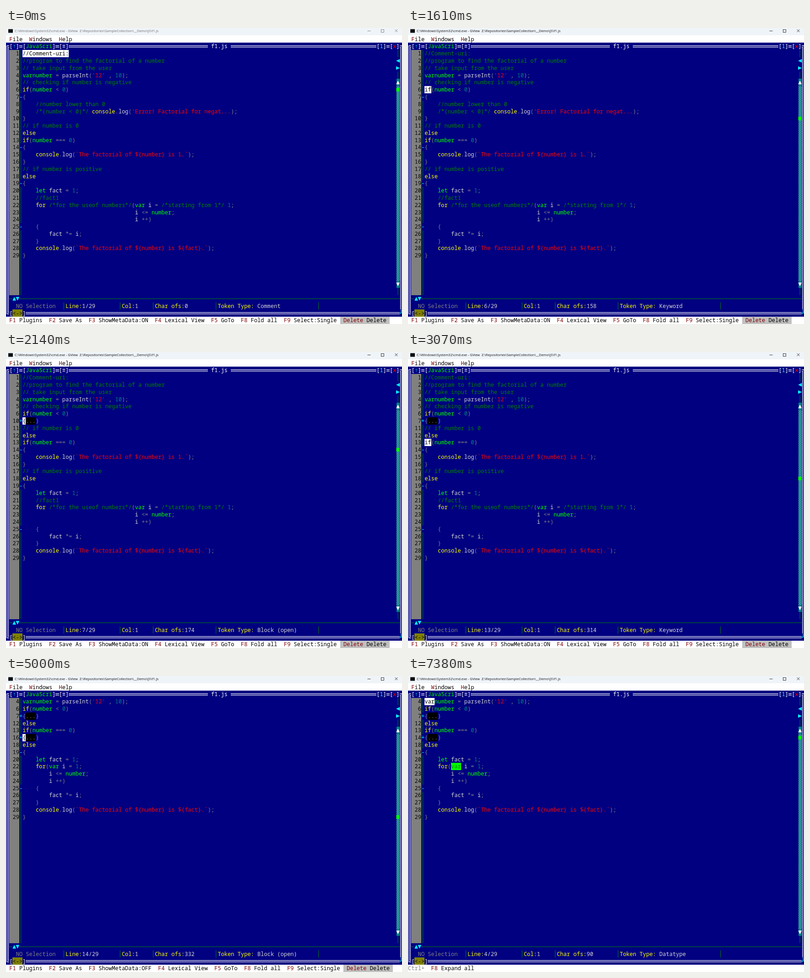
These frames come from a looping animation (865 by 648 pixels, 8320 ms). An HTML page with a canvas:

```html
<!DOCTYPE html>
<html lang="en">
<head>
<meta charset="utf-8">
<title>Code folding</title>
<style>
html, body { margin: 0; width: 100%; height: 100%; overflow: hidden; background: #000080; }
canvas { display: block; }
</style>
</head>
<body>
<canvas id="stage" width="865" height="648"></canvas>
<script>
const g = document.getElementById('stage').getContext('2d');
const LOOP = 8320, CW = 7.225, RH = 15.785, TOP = 16.6;
const NAVY = '#000080', GREEN = '#008000', LIME = '#00ff00', AQUA = '#00ffff', TEAL = '#008080',
  GRAY = '#808080', SILVER = '#d4d4d4', YELLOW = '#ffff00', MAROON = '#800000', WHITE = '#ffffff', BLACK = '#000000';

const SOURCE = `//Comment-uri:
//program to find the factorial of a number
// take input from the user
varnumber = parseInt('12' , 10);
// checking if number is negative
if(number < 0)
{
    //number lower than 0
    /*(number < 0)*/ console.log('Error! Factorial for negat...);
}
// if number is 0
else
if(number === 0)
{
    console.log(\`The factorial of \${number} is 1.\`);
}
// if number is positive
else
{
    let fact = 1;
    //fact1
    for /*for the useof numbers*/(var i = /*starting from 1*/ 1;
                                  i <= number;
                                  i ++)
    {
        fact *= i;
    }
    console.log(\`The factorial of \${number} is \${fact}.\`);
}`.split('\n');

const TOKEN = /\/\/.*|\/\*.*?\*\/|'[^')]*'?|`[^`]*`|var|let|number|[a-z]\w*|\d+|\S/gi;

// start time, line under the cursor
const STEPS = [[0, 1], [540, 2], [930, 3], [1130, 4], [1330, 5], [1610, 6], [1940, 7], [2670, 11],
  [2870, 12], [3070, 13], [3200, 14], [6260, 13], [6460, 12], [6590, 7], [6720, 6], [6920, 4]];
// line: character offset, token index
const PLACE = { 1: [0, 0], 2: [16, 1], 3: [61, 2], 4: [90, 3], 5: [123, 13], 6: [158, 14], 7: [174, 20],
  11: [289, 31], 12: [308, 32], 13: [314, 33], 14: [332, 39] };
// first line of a block: last line, time it folds
const FOLDS = { 7: [10, 2140], 14: [16, 3730] };

const colX = col => col * CW;
const rowY = row => TOP + row * RH;
const midX = col => colX(col + 0.5);
const midY = row => rowY(row + 0.5);

function rect(x, y, w, h, color) {
  g.fillStyle = color;
  g.fillRect(x, y, w, h);
}

// Fills whole character cells, with edges on whole pixels.
function cells(col, row, n, color, rows = 1) {
  const x = Math.round(colX(col)), y = Math.round(rowY(row));
  rect(x, y, Math.round(colX(col + n)) - x, Math.round(rowY(row + rows)) - y, color);
}

function text(str, col, row, color, back) {
  if (back) cells(col, row, str.length, back);
  g.fillStyle = color;
  [...str].forEach((ch, i) => {
    if (ch !== ' ') g.fillText(ch, midX(col + i), midY(row) + 4.2);
  });
  return col + str.length;
}

function line(x1, y1, x2, y2, color, width = 1) {
  g.strokeStyle = color;
  g.lineWidth = width;
  g.beginPath();
  g.moveTo(x1, y1);
  g.lineTo(x2, y2);
  g.stroke();
}

function vline(col, row, rows = 1) {
  line(midX(col), rowY(row), midX(col), rowY(row + rows), GREEN);
}

function triangle(col, row, turn, color) {
  g.save();
  g.translate(midX(col), midY(row));
  g.rotate(turn * Math.PI / 2);
  g.fillStyle = color;
  g.beginPath();
  g.moveTo(0, -4);
  g.lineTo(3.8, 4);
  g.lineTo(-3.8, 4);
  g.fill();
  g.restore();
}

function tokenColor(s) {
  if (/^\/[/*]/.test(s)) return GREEN;
  if (/^['`]/.test(s)) return '#ff0000';
  if (/^(if|else|for|console)$/.test(s)) return YELLOW;
  if (/^(var|let|number)$/.test(s)) return LIME;
  if (/^\d/.test(s)) return TEAL;
  return /^\w/.test(s) ? SILVER : GRAY;
}

function tokenType(s) {
  if (s.startsWith('//')) return 'Comment';
  if (s.startsWith('var')) return 'Datatype';
  return s === '{' ? 'Block (open)' : 'Keyword';
}

function drawTitle(t) {
  rect(0, 0, 865, 16, '#eff4f9');
  rect(0, 16, 865, 17, WHITE);
  rect(5, 2.5, 10, 8, '#0c0c0c');
  const level = t < 260 ? 110 : t < 400 ? 70 : t < 540 ? 35 : 15;
  const ink = `rgb(${level},${level},${level})`;
  g.font = '7.5px "Open Sans", "Noto Sans", sans-serif';
  g.textAlign = 'left';
  g.fillStyle = ink;
  g.fillText('C:\\Windows\\System32\\cmd.exe - GView  Z:\\Repositories\\SampleCollection\\__Demo\\JS\\f1.js', 19, 9);
  line(789.5, 6.5, 796.5, 6.5, ink, 0.8);
  g.strokeRect(819.5, 3.5, 6, 6);
  line(849.5, 3, 855.5, 9, ink, 0.8);
  line(855.5, 3, 849.5, 9, ink, 0.8);
}

function drawFrame() {
  cells(0, 1, 120, NAVY, 38);
  g.strokeStyle = WHITE;
  g.lineWidth = 1.2;
  for (const d of [-1.6, 1.6]) {
    const x = midX(0) + d, y = midY(1) + d;
    g.strokeRect(x, y, midX(119) - d - x, midY(38) - d - y);
  }
  const label = (parts, col, row) => {
    for (const [s, color, back = NAVY] of parts) col = text(s, col, row, color, back);
  };
  const boxed = (s, color, back) => [['[', WHITE], [s, color, back], [']', WHITE]];
  label(boxed('↑', AQUA), 1, 1);
  label(boxed('JavaScri', LIME), 5, 1);
  label(boxed('≡', WHITE), 16, 1);
  label([[' f1.js ', WHITE]], 61, 1);
  label(boxed('1', AQUA), 112, 1);
  label(boxed('x', '#ff0000'), 116, 1);
  label(boxed('<->', BLACK, '#808000'), 1, 38);
  cells(119, 38, 1, NAVY);
  line(midX(119), rowY(38), midX(119), midY(38) + 0.5, AQUA, 1.4);
  line(colX(119), midY(38), midX(119), midY(38), AQUA, 1.4);
}

function drawScroll(token) {
  vline(118, 2);
  triangle(118, 3, 3, AQUA);
  triangle(118, 4, 1, AQUA);
  vline(118, 5);
  cells(118, 6, 1, TEAL, 29);
  const end = rowY(34);
  for (let y = Math.ceil(rowY(7)), odd = 0; y < end; y += 2, odd ^= 1) {
    for (let x = 853 + odd * 2; x < 860; x += 4) rect(x, y, 1.3, 1.3, '#a8d4d4');
  }
  triangle(118, 6, 0, WHITE);
  triangle(118, 34, 2, WHITE);
  rect(colX(118), midY(7 + Math.floor(token * 0.295)) - 4, CW, 8, LIME);
  vline(118, 35);
}

function drawCode(t, current) {
  const meta = t < 5000;
  cells(1, 2, 3, GRAY, 34);
  vline(4, 2, 34);
  let row = 2;
  for (let n = 1; n <= SOURCE.length; n++) {
    let code = SOURCE[n - 1];
    if (!meta) {
      if (code.trim().startsWith('//')) continue;
      code = code.replace(/ \/\*.*?\*\//g, '').replace(/^ {34}/, ' '.repeat(8));
    }
    const fold = FOLDS[n], folded = fold && t >= fold[1], picked = n === current;
    const number = String(folded && picked ? fold[0] : n);
    text(number, 4 - number.length, row, BLACK);
    if (code.trim() === '{') text(folded ? '+' : '-', 4, row, AQUA, NAVY);
    for (const m of code.matchAll(TOKEN)) {
      const chosen = picked && m.index === 0;
      const twin = current === 4 && m[0] === 'var';
      const back = chosen ? WHITE : twin ? LIME : null;
      text(m[0], 5 + m.index, row, chosen ? BLACK : twin ? GREEN : tokenColor(m[0]), back);
    }
    if (folded) {
      text('...', 6, row, GRAY, BLACK);
      text('}', 9, row, GRAY);
      n = fold[0];
    }
    row++;
  }
}

function drawStatus(current) {
  line(colX(1), midY(36), colX(119), midY(36), GREEN);
  cells(2, 36, 2, NAVY);
  triangle(2, 36, 0, AQUA);
  triangle(3, 36, 2, AQUA);
  text('NO Selection', 3, 37, GRAY);
  const fields = [[17, 'Line:', current + '/29'], [34, 'Col:', '1'],
    [44, 'Char ofs:', String(PLACE[current][0])],
    [63, 'Token Type:', ' ' + tokenType(SOURCE[current - 1])], [94, '', '']];
  for (const [col, name, value] of fields) {
    vline(col, 37);
    text(value, text(name, col + 1, 37, YELLOW), 37, SILVER);
  }
}

function drawKeys(t) {
  cells(0, 39, 120, WHITE, 2);
  if (t >= 7380) {
    text('Ctrl+', 0, 39, GRAY);
    text('F8', 7, 39, MAROON);
    text('Expand all', 10, 39, BLACK);
    return;
  }
  const keys = [['F1', 'Plugins'], ['F2', 'Save As'], ['F3', 'ShowMetaData:' + (t < 5000 ? 'ON' : 'OFF')],
    ['F4', 'Lexical View'], ['F5', 'GoTo'], ['F8', 'Fold all'], ['F9', 'Select:Single'], ['Delete', 'Delete']];
  let col = 1;
  for (const [key, name] of keys) {
    if (key === 'Delete') cells(col - 1, 39, 15, '#c0c0c0');
    col = text(key, col, 39, MAROON) + 1;
    col = text(name, col, 39, BLACK) + 2;
  }
}

function draw(now) {
  const t = now % LOOP;
  const current = STEPS.filter(s => s[0] <= t).pop()[1];
  drawTitle(t);
  g.font = '12.04px "Noto Sans Mono", "DejaVu Sans Mono", monospace';
  g.textAlign = 'center';
  [['File', 1], ['Windows', 7], ['Help', 16]].forEach(([name, col]) => {
    text(name[0], col, 0, MAROON);
    text(name.slice(1), col + 1, 0, BLACK);
  });
  drawFrame();
  drawScroll(PLACE[current][1]);
  drawCode(t, current);
  drawStatus(current);
  drawKeys(t);
}

let start;
function tick(now) {
  start ??= now;
  draw(now - start);
  requestAnimationFrame(tick);
}
draw(0);
requestAnimationFrame(tick);
</script>
</body>
</html>
```
